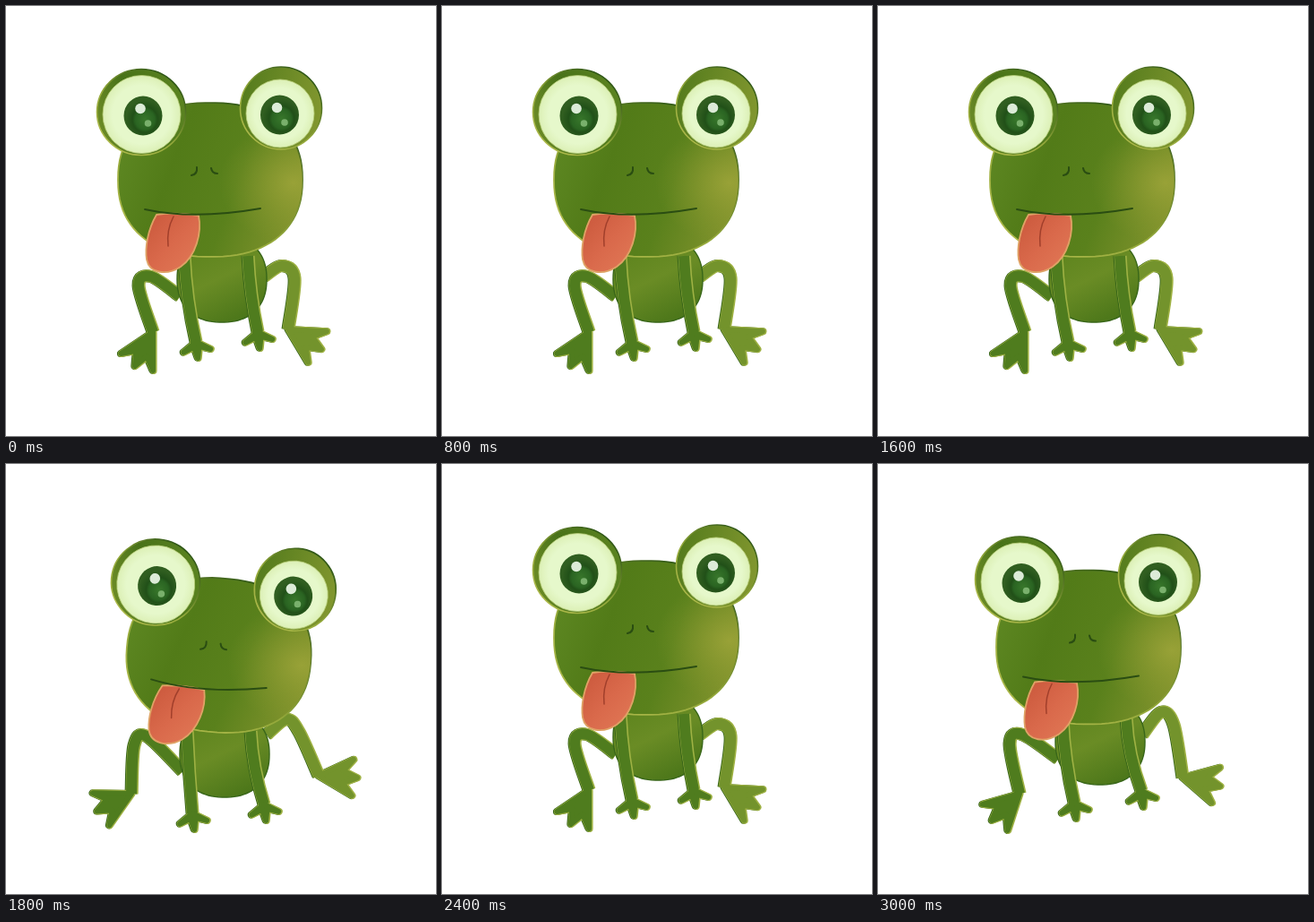
Animation, 480 px wide and 480 px high, one loop 3.2 s. Source, as an HTML page:

```html
<!DOCTYPE html>
<html lang="en">
<head>
<meta charset="utf-8">
<title>Frog</title>
<style>
  html, body { margin: 0; width: 100%; height: 100%; overflow: hidden; background: #fff; }
  svg { display: block; width: 100vw; height: 100vh; }
  .pose { visibility: hidden; animation: show 800ms step-end infinite; }
  .line { fill: none; stroke: #2a4d12; stroke-width: 2; stroke-linecap: round; }
  @keyframes show {
    0% { visibility: visible; }
    25%, 100% { visibility: hidden; }
  }
</style>
</head>
<body>
<svg id="stage" viewBox="0 0 480 480">
  <defs>
    <linearGradient id="skin" x1="0" y1=".3" x2="1" y2=".6">
      <stop offset="0" stop-color="#5d8722"/>
      <stop offset=".3" stop-color="#527b18"/>
      <stop offset=".65" stop-color="#5a811c"/>
      <stop offset="1" stop-color="#7f922c"/>
    </linearGradient>
    <radialGradient id="glow" cx=".95" cy=".52" r=".4">
      <stop offset="0" stop-color="#a3a83c" stop-opacity=".75"/>
      <stop offset="1" stop-color="#8d9a30" stop-opacity="0"/>
    </radialGradient>
    <linearGradient id="belly" x1=".2" y1="0" x2=".7" y2="1">
      <stop offset="0" stop-color="#5a821c"/>
      <stop offset=".5" stop-color="#6a8c25"/>
      <stop offset="1" stop-color="#4a7519"/>
    </linearGradient>
    <linearGradient id="lid0" x1="0" y1=".6" x2="1" y2=".3">
      <stop offset="0" stop-color="#6c8b26"/>
      <stop offset=".4" stop-color="#487219"/>
      <stop offset="1" stop-color="#5c8421"/>
    </linearGradient>
    <linearGradient id="lid1" x1="0" y1=".4" x2="1" y2=".6">
      <stop offset="0" stop-color="#557c1d"/>
      <stop offset="1" stop-color="#82972f"/>
    </linearGradient>
    <linearGradient id="rim" x1=".1" y1="1" x2=".8" y2=".1">
      <stop offset="0" stop-color="#b3bd4e"/>
      <stop offset=".5" stop-color="#93a83a"/>
      <stop offset="1" stop-color="#2f5716"/>
    </linearGradient>
    <radialGradient id="white">
      <stop offset=".75" stop-color="#e6f8cb"/>
      <stop offset="1" stop-color="#dcf0b6"/>
    </radialGradient>
    <radialGradient id="iris" cx=".55" cy=".6">
      <stop offset="0" stop-color="#38772b"/>
      <stop offset=".5" stop-color="#2a6422"/>
      <stop offset=".65" stop-color="#215018"/>
      <stop offset="1" stop-color="#305e20"/>
    </radialGradient>
    <linearGradient id="tongueFill" x2="1" y2="1">
      <stop offset="0" stop-color="#c9573b"/>
      <stop offset=".5" stop-color="#d9694b"/>
      <stop offset="1" stop-color="#e27a57"/>
    </linearGradient>
  </defs>
</svg>
<script>
// head: dx, dy, turn; body: dx, dy; wrists: x, y; legs: knee x, y, ankle x, y, foot angle
const poses = [
  { head: [0, 0, 0], body: [0, 0], wrists: [[212, 375], [281, 364]],
    legs: [[148, 312, 164, 364, 118], [322, 304, 315, 361, 31]] },
  { head: [9.5, 19.5, 4.7], body: [3, 19], wrists: [[208, 390], [288, 380]],
    legs: [[143, 314, 140, 368, 153], [327, 299, 349, 348, 3]] },
  { head: [8, 0, 4.8], body: [2, -6], wrists: [[217, 368], [285, 356]],
    legs: [[150, 312, 179, 364, 118], [322, 290, 315, 356, 32]] },
  { head: [7, 10.5, 0], body: [7, 5], wrists: [[219, 378], [294, 365]],
    legs: [[147, 312, 158, 368, 136], [330, 291, 340, 350, 13]] }
];
const LIMB = '#4f7c1e', PALE = '#73932c';

const polar = (x, y, r, deg) => {
  const a = deg * Math.PI / 180;
  return [x + r * Math.cos(a), y + r * Math.sin(a)];
};

const path = (d, attrs) => `<path d="${d}" ${attrs}/>`;

const oval = (x, y, rx, ry, fill, attrs = '') =>
  `<ellipse cx="${x}" cy="${y}" rx="${rx}" ry="${ry}" fill="${fill}" ${attrs}/>`;

// Superellipse, a little squarer than an ellipse
function blob(cx, cy, rx, ry) {
  const bend = v => Math.sign(v) * Math.abs(v) ** (2 / 2.3);
  const pts = [];
  for (let deg = 0; deg < 360; deg += 4) {
    const [c, s] = polar(0, 0, 1, deg);
    pts.push([cx + rx * bend(c), cy + ry * bend(s)]);
  }
  return `M${pts.join('L')}Z`;
}

// Open Catmull-Rom curve
function curve(pts) {
  let d = 'M' + pts[0];
  for (let i = 0; i < pts.length - 1; i++) {
    const b = pts[i], c = pts[i + 1];
    const a = pts[i - 1] || b, e = pts[i + 2] || c;
    const c1 = b.map((v, k) => v + (c[k] - a[k]) / 6);
    const c2 = c.map((v, k) => v - (e[k] - b[k]) / 6);
    d += `C${c1} ${c2} ${c}`;
  }
  return d;
}

// Three toes fanned around a direction, with webs between them
function paw(x, y, dir, spread, toe, web) {
  const pts = [[x, y]];
  for (let i = -2; i <= 2; i++) {
    pts.push(polar(x, y, i % 2 ? web : toe, dir + i * spread / 2));
  }
  return `M${pts.join('L')}Z`;
}

// Dark rim on the left, light rim on the right, colour on top
function limb(bone, foot, color, width) {
  const layer = (c, dx, grow) => `<g transform="translate(${dx} 0)" stroke="${c}" stroke-linejoin="round">`
    + path(bone, `fill="none" stroke-width="${width + grow}"`)
    + path(foot, `fill="${c}" stroke-width="${6 + grow}"`) + '</g>';
  return layer('#386619', -.5, 2) + layer('#9fb244', .6, 2) + layer(color, 0, 0);
}

function leg([kx, ky, ax, ay, dir], side, [bx, by]) {
  const hip = side ? [288 + bx, 302] : [194 + bx, 324 + by];
  const thigh = [kx + (side ? -14 : 14), ky - (side ? 14 : 10)];
  const bone = curve([hip, thigh, [kx, ky], [ax, ay]]);
  return limb(bone, paw(ax, ay, dir, 28, 43, 28), side ? PALE : LIMB, 12);
}

function arm([wx, wy], side, [bx, by]) {
  const sx = (side ? 270 : 199) + bx, sy = 279 + by;
  const bone = `M${sx} ${sy}Q${sx + 2} ${(sy + wy) / 2} ${wx} ${wy}`;
  return limb(bone, paw(wx, wy, 83, 57, 18, 6), LIMB, 12);
}

function eye(x, y, rx, ry, wx, wy, wr, ix, iy, side) {
  return oval(x, y, rx, ry, `url(#lid${side})`, 'stroke="url(#rim)" stroke-width="1.6"')
    + oval(wx, wy, wr, wr, 'url(#white)', 'stroke="#b9cf7c" stroke-width=".8"')
    + oval(ix, iy, 21.5, 22, 'url(#iris)')
    + oval(ix - 3, iy - 8, 5.8, 5.8, '#dcebd8')
    + oval(ix + 5.5, iy + 8.5, 3.8, 3.8, '#79b06c');
}

function head() {
  const face = blob(228, 194, 103, 86);
  return path(face, 'fill="url(#skin)" stroke="url(#rim)" stroke-width="1.8"')
    + path(face, 'fill="url(#glow)"')
    + path('M168 233C158 250 155 270 157 283C160 299 180 301 195 291C212 279 219 253 215 234Q190 230 168 233Z',
      'fill="url(#tongueFill)" stroke="#dfa366" stroke-width="1.8"')
    + path('M187 235Q179 250 181 268', 'class="line" style="stroke:#a13f2b;stroke-width:1.5"')
    + path('M155 227Q210 239 284 226', 'class="line"')
    + path('M213 180Q214 188 207 189M229 181Q230 187 236 187', 'class="line"')
    + eye(151, 118.5, 49.5, 48, 151.5, 121, 43.5, 153, 122.5, 0)
    + eye(307, 114, 45.5, 46, 306, 120, 38, 305.5, 121.5, 1);
}

function frog(p) {
  const [hx, hy, turn] = p.head, [bx, by] = p.body;
  return p.legs.map((l, side) => leg(l, side, p.body)).join('')
    + path(blob(241 + bx, 305 + by, 50, 48), 'fill="url(#belly)" stroke="#386619" stroke-width="1.4"')
    + p.wrists.map((w, side) => arm(w, side, p.body)).join('')
    + `<g transform="translate(${hx} ${hy}) rotate(${turn} 228 194)">${head()}</g>`;
}

document.getElementById('stage').innerHTML += poses.map((p, i) =>
  `<g class="pose" style="animation-delay:${i * 200 - 800}ms">${frog(p)}</g>`).join('');
</script>
</body>
</html>
```
